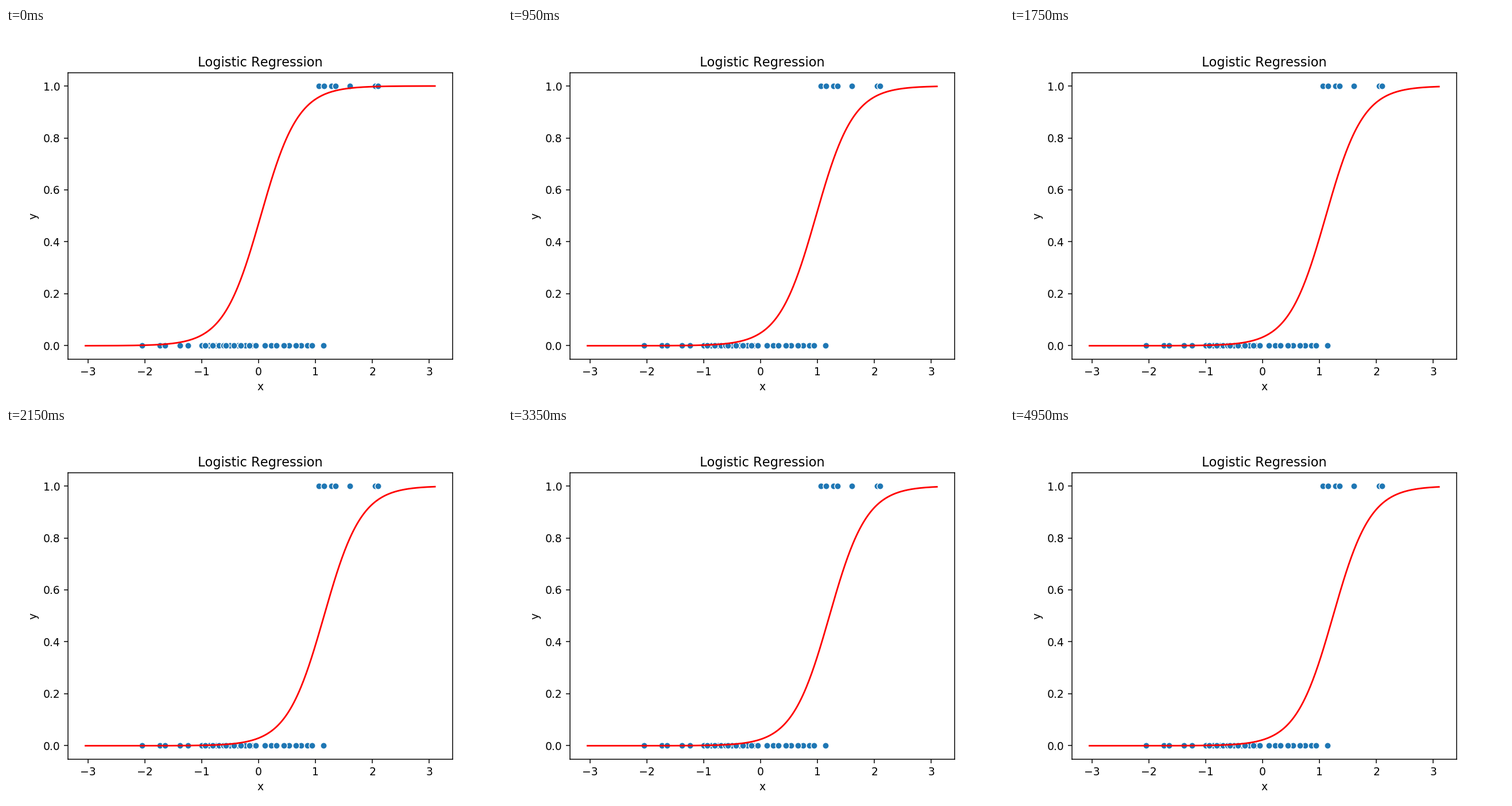
Recreate the animation shown at these times as a matplotlib script. Size 864 px wide and 648 px high, loop 5000 ms.

```python
import numpy as np
import matplotlib.pyplot as plt
from matplotlib.animation import FuncAnimation

FRAMES = 100
INTERVAL = 50
SLOPE = 3.04
START, LIMIT = 1.12, 45.0  # first and final odds against class 1 at x = 0
TAU, POWER = 33.9, 1.08    # pace of the approach to the limit


def sigmoid(z):
    return 1 / (1 + np.exp(-z))


def midpoint(step):
    """Where the curve crosses 0.5 after a number of training steps."""
    gap = (LIMIT - START) * np.exp(-(step / TAU) ** POWER)
    return np.log(LIMIT - gap) / SLOPE


def fit(step):
    return sigmoid(SLOPE * (xs - midpoint(step)))


# A few lone points and two crowded stretches drawn in random order
rng = np.random.RandomState(4)
lone = [-2.045, -1.74, -1.65, -1.385, -1.24, 1.14]
crowd = np.concatenate([np.linspace(-1.01, -0.05, 16),
                        np.linspace(0.12, 0.95, 9)])
crowd += rng.uniform(-0.015, 0.015, crowd.size)
zeros = np.concatenate([lone, rng.permutation(crowd)])
ones = np.array([1.06, 1.15, 1.28, 1.35, 1.60, 2.05, 2.10])

plt.rcParams["font.family"] = "DejaVu Sans"
plt.rcParams["text.kerning_factor"] = 6
fig, ax = plt.subplots(figsize=(6.4, 4.8), dpi=135)

xs = np.linspace(zeros.min() - 1, ones.max() + 1, 400)
margin = 0.05 * np.ptp(xs)
ax.set_xlim(xs[0] - margin, xs[-1] + margin)
ax.set_ylim(-0.0514, 1.0514)
ax.set(title="Logistic Regression", xlabel="x", ylabel="y")

for level, points in enumerate([zeros, ones]):
    ax.scatter(points, np.full(points.size, level), s=36, color="#1f77b4",
               edgecolors="white", linewidths=0.75)
curve, = ax.plot(xs, fit(0), color="red", lw=1.5)


def update(step):
    curve.set_ydata(fit(step))
    return curve,


anim = FuncAnimation(fig, update, frames=FRAMES, interval=INTERVAL,
                     repeat=True, repeat_delay=0)
plt.show()
```
